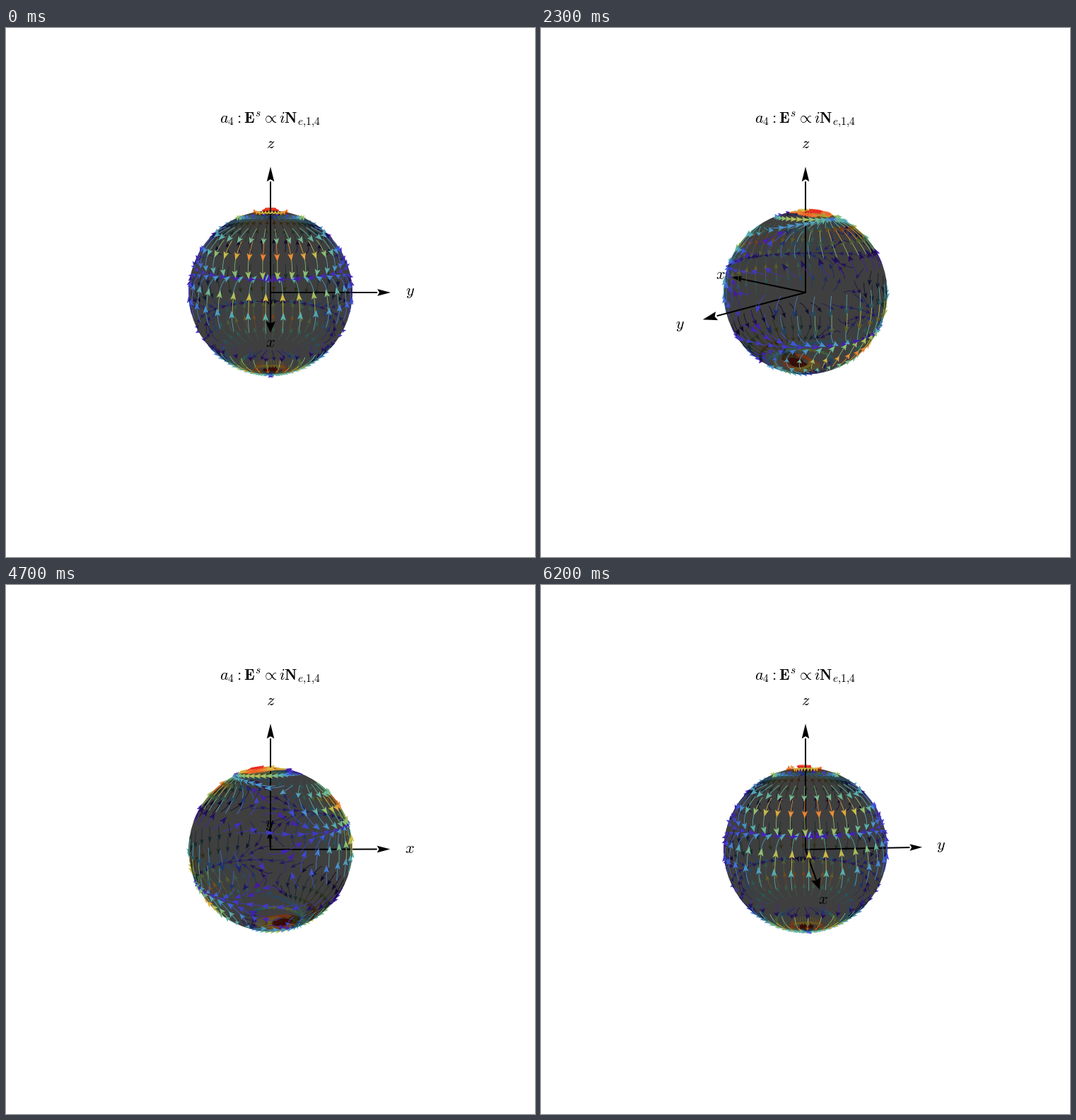
Animation, 748 px wide and 748 px high, one loop 6.3 s. Source, as a matplotlib script:

```python
import numpy as np
import matplotlib.pyplot as plt
from matplotlib.animation import FuncAnimation
from matplotlib.collections import LineCollection, PolyCollection
from matplotlib.colors import LinearSegmentedColormap
from matplotlib.patches import Circle, Polygon

SIZE, DPI = 748, 100
CENTER = SIZE / 2
FRAMES, STEP = 63, 0.1            # camera turns 0.1 rad per frame
DIST, FOCAL = 4.92, 557           # sphere radius is 1
SIN_E, COS_E = 0.236, 0.9718      # camera elevation
AXIS_LEN, LABEL_POS = 1.5, 1.747
PX = 72 / DPI

plt.rcParams["mathtext.fontset"] = "cm"
RAINBOW = LinearSegmentedColormap.from_list("field", [
    "#4a12a0", "#4420b4", "#3c55dc", "#4690d0", "#5cb3a8",
    "#90c070", "#d4bc40", "#f08430", "#e82020"])


def project(p, t):
    """Screen x, y and depth towards the viewer for points p."""
    x, y, z = np.moveaxis(np.asarray(p, float), -1, 0)
    right = y * np.cos(t) - x * np.sin(t)
    fwd = x * np.cos(t) + y * np.sin(t)
    depth = fwd * COS_E + z * SIN_E
    k = FOCAL / (DIST - depth)
    up = z * COS_E - fwd * SIN_E
    return np.stack([CENTER + k * right, CENTER - k * up], -1), depth


def field(p):
    """Tangential part of the even (m=1, n=4) vector harmonic."""
    x, y, c = p.T
    phi = np.arctan2(y, x)
    s = np.hypot(x, y)
    e_theta = -np.cos(phi) * (28 * c**4 - 27 * c**2 + 3)
    e_phi = np.sin(phi) * (7 * c**3 - 3 * c)
    theta_hat = np.stack([c * np.cos(phi), c * np.sin(phi), -s], -1)
    phi_hat = np.stack([-np.sin(phi), np.cos(phi), 0 * phi], -1)
    vec = e_theta[:, None] * theta_hat + e_phi[:, None] * phi_hat
    return vec, e_theta, e_phi


def unit(v):
    return v / np.maximum(np.linalg.norm(v, axis=-1, keepdims=True), 1e-9)


def make_seeds():
    lat = np.radians(np.r_[-86, np.arange(-7, 8) * 11.25, 86])
    lat, j = np.meshgrid(lat, np.arange(36), indexing="ij")
    phi = np.radians(10 * j - 2.8 - 2.5 * (lat > 0.5))
    pts = np.stack([np.cos(lat) * np.cos(phi),
                    np.cos(lat) * np.sin(phi), np.sin(lat)], -1)
    return pts.reshape(-1, 3)


def trace(p, length=0.16, steps=8):
    path = [p]
    for _ in range(steps):
        p = unit(p + unit(field(p)[0]) * length / steps)
        path.append(p)
    return np.stack(path, 1)


def arrow_head(base, tip, half_width, notch, min_len):
    """Notched triangles between projected base and tip points."""
    d = tip - base
    n = np.linalg.norm(d, axis=-1, keepdims=True)
    u = d / np.maximum(n, 1e-6)
    base = tip - u * np.maximum(n, min_len)
    side = np.stack([-u[..., 1], u[..., 0]], -1) * half_width
    inner = base + (tip - base) * notch
    return np.stack([tip, base + side, inner, base - side], -2)


seeds = make_seeds()
paths = trace(seeds)
colors = RAINBOW(np.linalg.norm(field(seeds)[0], axis=1) / 4)
ends = paths[:, -1]
end_dir, end_theta, end_phi = field(ends)
end_dir = unit(end_dir)
bases, tips = ends - 0.015 * end_dir, ends + 0.07 * end_dir

# heads that stand outside the surface, the others sink into it
bulge = np.cos(np.arctan2(ends[:, 1], ends[:, 0]))
bulge = bulge * np.where(ends[:, 2] > -0.41, 1, -1)
raised = (bulge > -0.25) | (np.abs(end_phi) > np.abs(end_theta))

fig = plt.figure(figsize=(SIZE / DPI, SIZE / DPI), dpi=DPI, facecolor="white")
ax = fig.add_axes([0, 0, 1, 1])
ax.set_xlim(0, SIZE)
ax.set_ylim(SIZE, 0)
ax.axis("off")

# two half-transparent black layers: far and near side of the ball
radius = FOCAL / np.sqrt(DIST**2 - 1)
for z in (2, 4):
    ax.add_patch(Circle((CENTER, CENTER), radius, fc="black", ec="none",
                        alpha=0.5, zorder=z))

lines, heads = [], []
for z in (1, 3, 5):
    lines.append(ax.add_collection(
        LineCollection([], linewidths=0.8 * PX, zorder=z), autolim=False))
    heads.append(ax.add_collection(
        PolyCollection([], linewidths=0, zorder=z + 0.1), autolim=False))


def label(text, x, y):
    return ax.text(x, y, text, fontsize=16, ha="center", va="center", zorder=8)


label(r"$a_4:\mathbf{E}^s\propto i\mathbf{N}_{e{,}1{,}4}$", CENTER, 130)

rods = []
for direction, name in zip(np.eye(3), "xyz"):
    inner, = ax.plot([], [], color="black", lw=2 * PX, zorder=3.5)
    outer, = ax.plot([], [], color="black", lw=2 * PX, solid_capstyle="butt")
    cone = ax.add_patch(Polygon(np.zeros((4, 2)), fc="black", ec="none"))
    rods.append((direction, inner, outer, cone, label(f"${name}$", 0, 0)))


def draw_field(t):
    pts, _ = project(paths, t)
    base, _ = project(bases, t)
    tip, depth = project(tips, t)
    _, end_depth = project(ends, t)
    front = end_depth > 1 / DIST
    half = 0.029 * FOCAL / (DIST - depth)
    polys = arrow_head(base, tip, half[:, None], 0.2, 5)
    head_layer = front.astype(int) + raised
    line_layer = np.where(front, 2, head_layer)
    for i in range(3):
        on = line_layer == i
        lines[i].set_segments(list(pts[on]))
        lines[i].set_color(colors[on])
        on = head_layer == i
        heads[i].set_verts(list(polys[on]))
        heads[i].set_facecolor(colors[on])


def draw_axes(t):
    for direction, inner, outer, cone, text in rods:
        marks = np.outer([0, 1, AXIS_LEN - 0.165, AXIS_LEN, LABEL_POS],
                         direction)
        pts, depth = project(marks, t)
        z = 6 if depth[3] > 0 else 0.5
        inner.set_data(*pts[:2].T)
        outer.set_data(*pts[1:3].T)
        half = 0.043 * FOCAL / (DIST - depth[3])
        cone.set_xy(arrow_head(pts[2], pts[3], half, 0.15, 16))
        outer.set_zorder(z)
        cone.set_zorder(z)
        text.set_position(pts[4])


def update(k):
    draw_field(k * STEP)
    draw_axes(k * STEP)
    return []


anim = FuncAnimation(fig, update, frames=FRAMES, interval=100,
                     init_func=lambda: update(0), repeat=True, repeat_delay=0)
plt.show()
```
